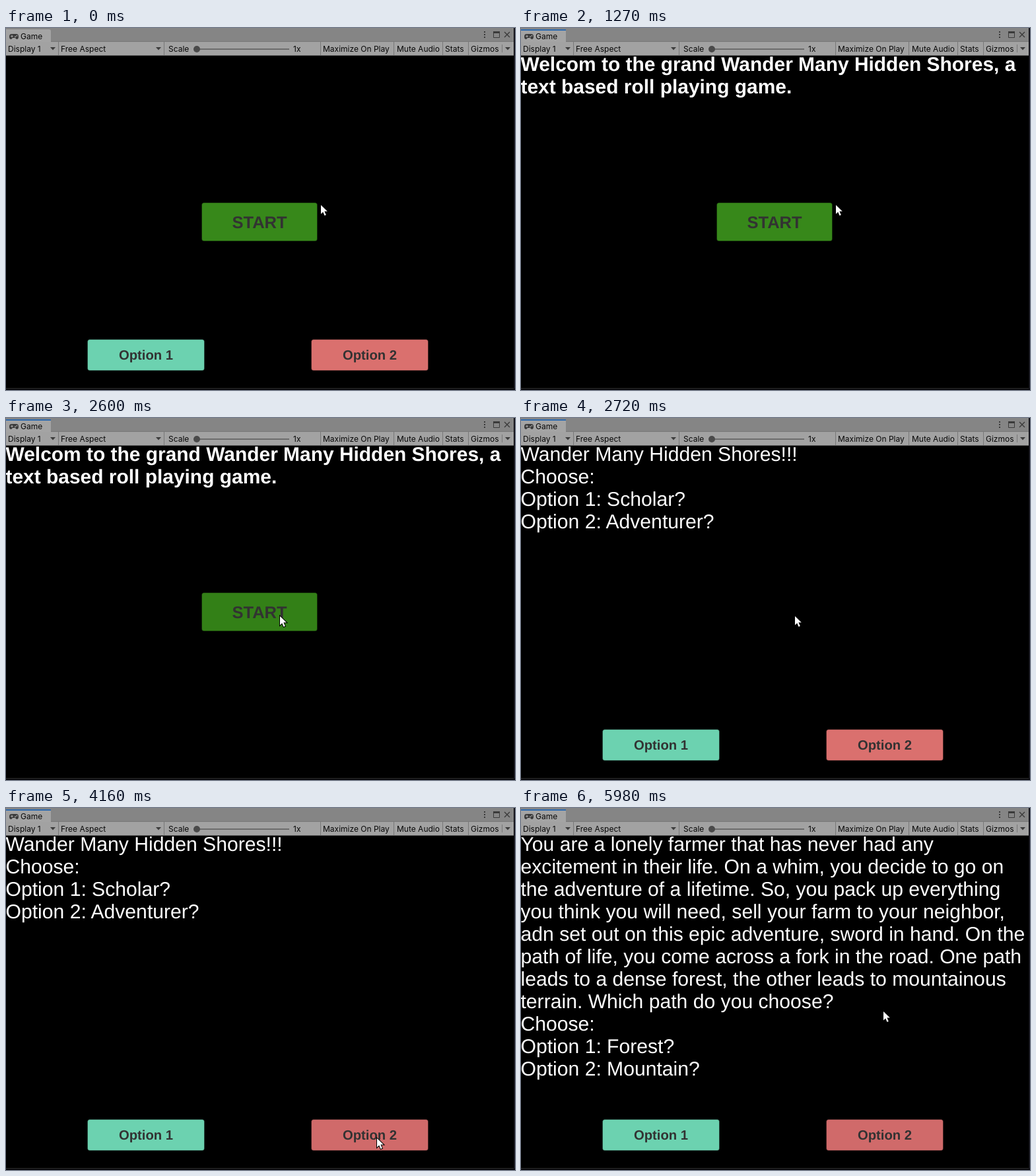
These frames come from a looping animation (771x548 px, 8000 ms). An HTML page:

```html
<!DOCTYPE html>
<html lang="en">
<head>
<meta charset="utf-8">
<title>Text adventure</title>
<style>
  html, body { margin: 0; width: 100%; height: 100%; overflow: hidden; background: #000; }
  svg { display: block; width: 771px; height: 548px; }
  text { font-kerning: none; white-space: pre; }
  .ui { font: 12px Inter, sans-serif; fill: #080808; }
  .story { font: 30.13px "Liberation Sans", Arial, sans-serif; fill: #fff; text-rendering: geometricPrecision; }
  .story.bold { font-weight: bold; font-size: 29.93px; }
  .label { font: bold 20.3px "Liberation Sans", Arial, sans-serif; fill: #323232; text-anchor: middle; text-rendering: geometricPrecision; }
  .label.big { font-size: 25.5px; }
</style>
</head>
<body>
<svg id="stage" viewBox="0 0 771 548"></svg>
<script>
const LOOP = 8000;
const stage = document.getElementById('stage');

const rect = (x, y, w, h, fill, extra = '') =>
  `<rect x="${x}" y="${y}" width="${w}" height="${h}" fill="${fill}" ${extra}/>`;
const uiText = (x, y, s) => `<text class="ui" x="${x}" y="${y}">${s}</text>`;
const arrow = (x) => `<path d="M${x - 4},29h8l-4,4.5z" fill="#3c3c3c"/>`;

const button = (id, x, y, w, h, label, base, big = '') =>
  `<g id="${id}">
     <rect x="${x + .5}" y="${y + .5}" width="${w - 1}" height="${h - 1}" rx="3.5" fill="${base}"
       stroke="#000" stroke-opacity=".3"/>
     <text class="label ${big}" x="${x + w / 2}" y="${big ? 302.5 : 502}">${label}</text>
   </g>`;

const story = (id, lines, cls = '') =>
  `<g id="${id}">` + lines.map((s, i) =>
    `<text class="story ${cls}" x="-0.5" y="${65 + 34 * i}">${s}</text>`).join('') + '</g>';

const tabBar =
  rect(0, 0, 769, 21, '#858585') +
  rect(0, 20, 769, 1, '#787878') +
  '<path d="M0,2H65Q68,2 68,5V21H0z" fill="#a4a4a4"/>' +
  rect(0, 2, 68, 2, '#2f6bae', 'id="focus"') +
  `<path d="M8.5,9h7q3.5,0 3.5,4t-2.5,4q-1.3,0-2.5-2h-4q-1.2,2-2.5,2Q5,17 5,13t3.5-4z" fill="#3a3a3a"/>
   <path d="M7,12.5h4M9,10.5v4" stroke="#a4a4a4"/>
   <circle cx="14" cy="13.2" r="1" fill="#a4a4a4"/><circle cx="16.4" cy="11.8" r="1" fill="#a4a4a4"/>` +
  uiText(22, 17, 'Game') +
  [5, 9, 13].map(y => rect(724, y, 2, 2, '#3a3a3a')).join('') +
  rect(738, 5, 10, 3, '#3a3a3a') +
  `<path d="M738.5,6.5h9v8h-9z" fill="none" stroke="#3a3a3a"/>
   <path d="M755,6l8,8m0-8l-8,8" stroke="#3a3a3a" stroke-width="1.4"/>`;

const toolBar =
  rect(0, 21, 769, 21, '#a2a2a2') +
  rect(0, 41, 769, 1, '#6b6b6b') +
  [79, 239, 476, 587, 661, 700].map(x => rect(x, 21, 1, 20, '#777')).join('') +
  rect(751, 25, 1, 12, '#777') +
  [[3, 'Display 1'], [83, 'Free Aspect'], [246, 'Scale'], [435, '1x'], [480, 'Maximize On Play'],
   [592, 'Mute Audio'], [665, 'Stats'], [704, 'Gizmos']].map(([x, s]) => uiText(x, 36, s)).join('') +
  [71, 231, 760].map(arrow).join('') +
  rect(289, 31, 140, 2, '#6c6c6c') +
  '<circle cx="289" cy="32" r="5" fill="#4a4a4a"/>';

stage.innerHTML =
  rect(0, 0, 771, 548, '#000') +
  story('intro', [
    'Welcom to the grand Wander Many Hidden Shores, a',
    'text based roll playing game.'], 'bold') +
  story('pick', [
    'Wander Many Hidden Shores!!!',
    'Choose:',
    'Option 1: Scholar?',
    'Option 2: Adventurer?']) +
  story('quest', [
    'You are a lonely farmer that has never had any',
    'excitement in their life. On a whim, you decide to go on',
    'the adventure of a lifetime. So, you pack up everything',
    'you think you will need, sell your farm to your neighbor,',
    'adn set out on this epic adventure, sword in hand. On the',
    'path of life, you come across a fork in the road. One path',
    'leads to a dense forest, the other leads to mountainous',
    'terrain. Which path do you choose?',
    'Choose:',
    'Option 1: Forest?',
    'Option 2: Mountain?']) +
  button('start', 296, 264, 176, 59, 'START', '#37881a', 'big') +
  button('opt1', 123, 471, 178, 48, 'Option 1', '#6cd2b0') +
  button('opt2', 462, 471, 178, 48, 'Option 2', '#da706e') +
  tabBar + toolBar +
  rect(0, 545, 771, 1, '#2b2b2b') + rect(0, 546, 771, 2, '#09090d') +
  rect(769, 0, 1, 546, '#101014') + rect(770, 0, 1, 546, '#1b1b26') +
  `<path id="cursor" d="M1,2V15.6L4.2,12.4L6.6,18L8.8,17.1L6.4,11.4H10.8z"
     fill="#fff" stroke="#000" stroke-width="2" paint-order="stroke"/>`;

const el = id => document.getElementById(id);
const parts = ['intro', 'pick', 'quest', 'start', 'opt1', 'opt2', 'focus'];

// [time, visible parts]
const scenes = [
  [0, 'start opt1 opt2'],
  [1270, 'intro start focus'],
  [2720, 'pick opt1 opt2 focus'],
  [4590, 'quest opt1 opt2 focus']
];

// [time, x, y] of the white tip
const moves = [
  [0, 477, 268], [1420, 482, 258], [1540, 484, 243], [1670, 480, 226], [1790, 475, 214],
  [1940, 476, 212], [2060, 469, 210], [2210, 460, 222], [2330, 438, 258], [2450, 417, 294],
  [2600, 415, 300], [2970, 415, 298], [3120, 414, 262], [3250, 413, 232], [3650, 448, 331],
  [3800, 500, 420], [3920, 548, 500], [4040, 565, 522], [4160, 562, 500],
  [4740, 555, 341], [4890, 547, 307], [5980, 549, 308]
];

const startTint = [[0, '#37881a'], [2450, '#338017']];
const optTint = [[0, '#da706e'], [3920, '#d06a6a'], [4590, '#c96565'], [4740, '#d06a6a']];

const at = (table, t) => table.findLast(row => row[0] <= t);
const tint = (id, table, t) => el(id).firstElementChild.setAttribute('fill', at(table, t)[1]);

function draw(t) {
  const shown = at(scenes, t)[1].split(' ');
  for (const id of parts) el(id).style.display = shown.includes(id) ? '' : 'none';
  tint('start', startTint, t);
  tint('opt2', optTint, t);
  const [, x, y] = at(moves, t);
  el('cursor').setAttribute('transform', `translate(${x - 1} ${y - 2})`);
}

const begin = performance.now();
function tick() {
  draw((performance.now() - begin) % LOOP);
  requestAnimationFrame(tick);
}
tick();
</script>
</body>
</html>
```
